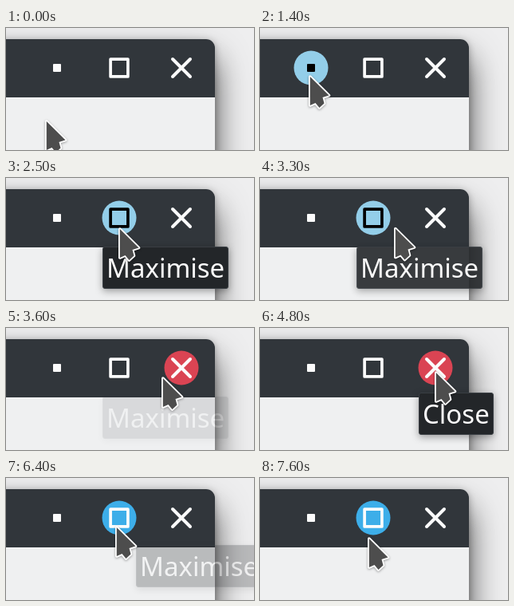
Recreate the animation shown at these times as an HTML page. Size 311x153 px, loop 7.7 s.

```html
<!DOCTYPE html>
<html lang="en">
<head>
<meta charset="utf-8">
<title>Window buttons</title>
<style>
html, body { margin: 0; width: 100%; height: 100%; overflow: hidden; background: #eeeeef; }
#stage { position: relative; width: 311px; height: 153px; overflow: hidden; }
#win {
  position: absolute; left: -300px; top: 13.5px; width: 562px; height: 400px;
  border-radius: 11px; overflow: hidden; background: #eff0f1;
  box-shadow: 0 24px 40px rgba(0, 0, 0, .7), 0 2px 10px rgba(0, 0, 0, .3);
}
#bar { height: 73px; background: #31363b; }
svg { position: absolute; left: 0; top: 0; }
.tip {
  position: absolute; box-sizing: border-box; height: 53px; padding: 3px 4px;
  border: 1px solid #3a3f44; border-radius: 3px; background: #232629; color: #fcfcfc;
  font: 33px/45px "Noto Sans", "Open Sans", sans-serif; white-space: nowrap;
  box-shadow: 0 3px 10px rgba(0, 0, 0, .35);
}
#cursor { filter: drop-shadow(0 1px 1.5px rgba(0, 0, 0, .35)); }
</style>
</head>
<body>
<div id="stage">
  <div id="win"><div id="bar"></div></div>
  <svg width="311" height="153">
    <g id="buttons" fill="none" stroke-linecap="round" stroke-linejoin="round"></g>
  </svg>
  <div id="tips"></div>
  <svg width="311" height="153">
    <path id="cursor" d="M.8 0L24.5 23.5L16.5 26L18.5 33.5L12.5 39L7.5 33L.8 36Z" fill="#4d4d4d"
      stroke="#fff" stroke-width="3.6" stroke-linejoin="round" paint-order="stroke"/>
  </svg>
</div>
<script>
const LOOP = 7700, STEP = 100, BAR_BOTTOM = 87, PITCH = 78;
const $ = id => document.getElementById(id);
const WHITE = [252, 252, 252], BLACK = [0, 0, 0];
const LIGHT = [147, 206, 233], BLUE = [61, 174, 233], RED = [218, 68, 83];

const home = { x: 50, y: 117 };
const moves = [
  { from: 300, to: 900, x: 58, y: 63 },
  { from: 1100, to: 1200, x: 62, y: 61 },
  { from: 1400, to: 2100, x: 142, y: 64 },
  { from: 3000, to: 3600, x: 196, y: 63 },
  { from: 3600, to: 3900, x: 218, y: 43 },
  { from: 4100, to: 4200, x: 220, y: 56 },
  { from: 4800, to: 5500, x: 139, y: 63 },
  { from: 5600, to: 5700, x: 138, y: 62 },
  { from: 7500, to: 7600, x: 136, y: 76 }
];

const buttons = [
  { x: 64, disc: LIGHT, ink: BLACK, shape: '<rect x="-4" y="-4" width="8" height="8" stroke-width="2" fill="currentColor"/>' },
  { x: 142, disc: LIGHT, ink: BLACK, pressAt: 6200, shape: '<rect x="-10.9" y="-10.9" width="21.8" height="21.8" stroke-width="3.7"/>' },
  { x: 220, disc: RED, ink: WHITE, shape: '<path d="M-11-11L11 11M11-11L-11 11" stroke-width="4"/>' }
];

const tips = [
  { text: "Maximise", x: 121, y: 86, show: [2100, 2500], hide: [3200, 3700] },
  { text: "Close", x: 199, y: 81, show: [4700, 4800], hide: [5000, 5300] },
  { text: "Maximise", x: 163, y: 84, show: [5100, 5500], hide: [6200, 6500] }
];

function ease(t, from, to) {
  const k = Math.min(1, Math.max(0, (t - from) / (to - from)));
  return k * k * (3 - 2 * k);
}
const mix = (a, b, k) => a.map((v, i) => v + (b[i] - v) * k);
const rgb = c => `rgb(${c.map(Math.round)})`;

function cursorAt(t) {
  let { x, y } = home;
  for (const m of moves) {
    const k = ease(t, m.from, m.to);
    x += (m.x - x) * k;
    y += (m.y - y) * k;
  }
  return { x, y };
}

// Hover fades over 150 ms: the share of recent moments spent over the button.
function hover(button, t) {
  const inside = [0, 50, 100, 150].filter(ago => {
    const p = cursorAt(t - ago);
    return p.y < BAR_BOTTOM && Math.abs(p.x - button.x) < PITCH / 2;
  });
  return inside.length / 4;
}

$("buttons").innerHTML = buttons.map(b =>
  `<g transform="translate(${b.x} 50)"><circle r="21.5"/><g stroke="currentColor">${b.shape}</g></g>`
).join("");
buttons.forEach((b, i) => [b.circle, b.glyph] = $("buttons").children[i].children);

for (const tip of tips) {
  tip.box = $("tips").appendChild(document.createElement("div"));
  tip.box.className = "tip";
  tip.box.textContent = tip.text;
  tip.box.style.left = tip.x + "px";
  tip.box.style.top = tip.y + "px";
}

function draw(now) {
  const t = Math.floor(now % LOOP / STEP) * STEP;
  const p = cursorAt(t);
  $("cursor").setAttribute("transform", `translate(${p.x} ${p.y})`);
  for (const b of buttons) {
    const over = hover(b, t);
    const press = b.pressAt ? ease(t, b.pressAt, b.pressAt + 200) : 0;
    b.circle.style.opacity = over;
    b.circle.style.fill = rgb(mix(b.disc, BLUE, press));
    b.glyph.style.color = rgb(mix(WHITE, b.ink, over * (1 - press)));
  }
  for (const tip of tips) tip.box.style.opacity = ease(t, ...tip.show) - ease(t, ...tip.hide);
}

const start = performance.now();
function tick() {
  draw(performance.now() - start);
  requestAnimationFrame(tick);
}
tick();
</script>
</body>
</html>
```
